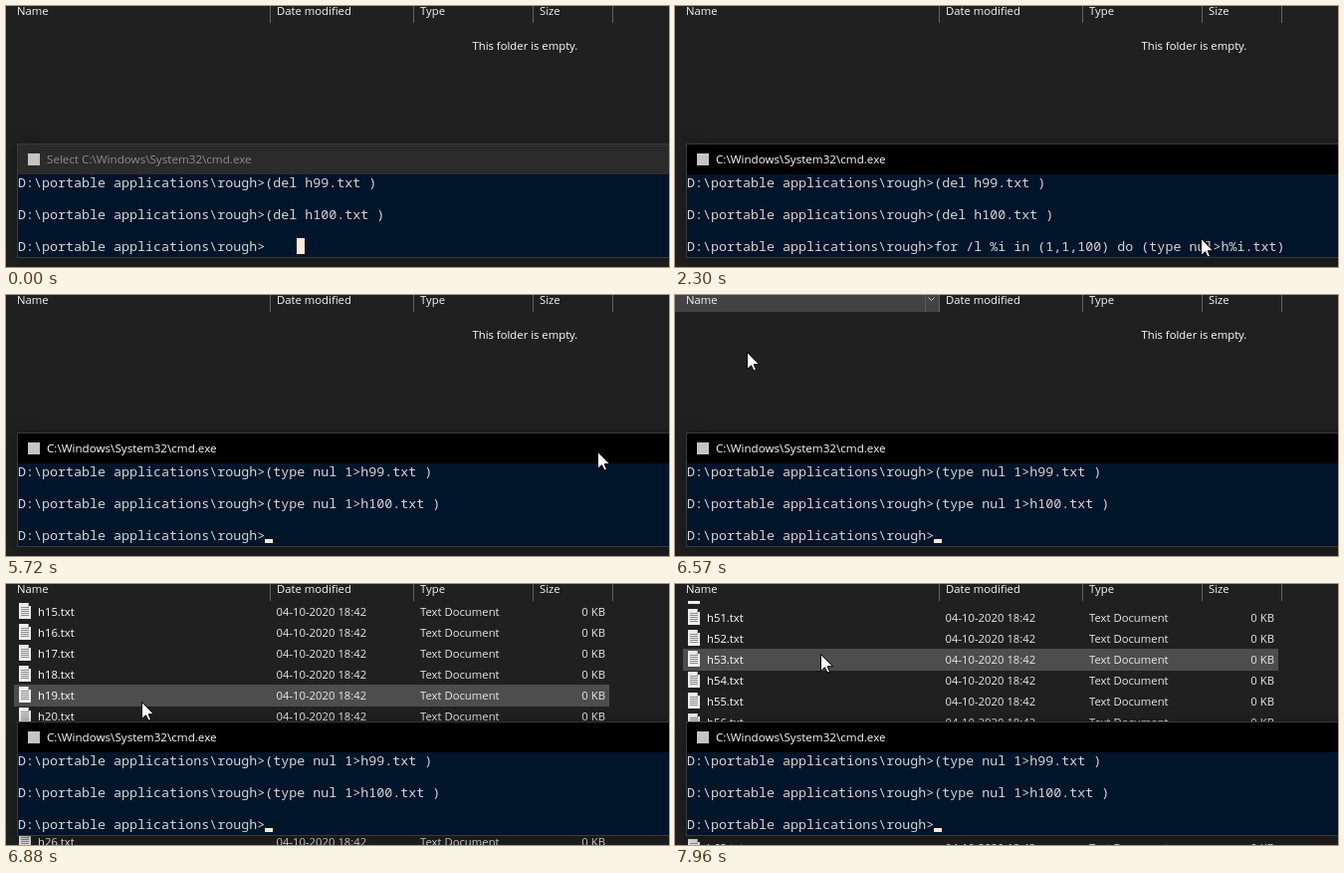
Write an HTML page with a canvas that moves like this. It is 666 px wide and 262 px high and loops after 8 s.

```html
<!DOCTYPE html>
<html lang="en">
<head>
<meta charset="utf-8">
<title>Creating files in a loop</title>
<style>
html, body { margin: 0; width: 100%; height: 100%; overflow: hidden; background: #202020; }
canvas { display: block; }
</style>
</head>
<body>
<canvas id="stage" width="666" height="262"></canvas>
<script>
const ctx = document.getElementById('stage').getContext('2d');
const LOOP = 8000, STEP = 77, BLINK = 543;
const UI = '11.3px "Open Sans", "Noto Sans", sans-serif';
const TITLE = '11.65px "Open Sans", "Noto Sans", sans-serif';
const MONO = '13.35px "Noto Sans Mono", "DejaVu Sans Mono", monospace';

const PROMPT = 'D:\\portable applications\\rough>';
const LOOP_HEAD = 'for /l %i in (1,1,100) do ';
const CELL = 8, LINE = 16, CON_X = 12, CON_Y = 169;
const ROW = 21, FIRST_ROW = 34, HEADER = 17;

// Moments of the story, in ms
const ENTER = 500, CLICK = ENTER + 2 * STEP, CLICK_END = 900, FIRST_BLINK = 1280;
const RECALL = 1510, RECALL_AGAIN = 2130, BLINK_AGAIN = 2300, DRIFT = 3400;
const RUN = 4940, LEAVE = 5720, HOVER = LEAVE + 12 * STEP;
const LISTED = LEAVE + 13 * STEP, WHEEL = LISTED + STEP, WHEEL_2 = 7340, WHEEL_3 = 7880;

const clamp = (v, lo, hi) => Math.min(hi, Math.max(lo, v));
const lerp = (a, b, u) => a + (b - a) * u;

// The screen refreshes in fixed steps while something moves.
const steps = (t, start, count) => clamp(Math.floor((t - start) / STEP) + 1, 0, count);
const progress = (t, start, count) => steps(t, start, count) / count;

const line = (from, to, u) => from.map((v, i) => lerp(v, to[i], u));

function bezier(a, b, c, d, u) {
  const ab = line(a, b, u), bc = line(b, c, u), cd = line(c, d, u);
  return line(line(ab, bc, u), line(bc, cd, u), u);
}

function pointerAt(t) {
  const prompt = [529, 233], titleBar = [621, 164], list = [73, 57], row = [137, 118];
  if (t < DRIFT) return line([500, 265], prompt, progress(t, ENTER, 3));
  if (t < LEAVE) return line(prompt, titleBar, progress(t, DRIFT, 4));
  if (t < HOVER) return bezier(titleBar, [551, 154], [60, -90], list, progress(t, LEAVE, 12));
  if (t < WHEEL_2) return line(list, row, progress(t, HOVER, 4));
  return line(row, [147, 70], progress(t, WHEEL_2, 4));
}

function scrollAt(t) {
  const slow = steps(t, WHEEL_2, 4) + steps(t, WHEEL_3, 2);
  return Math.min(20 * ROW, 150 * steps(t, WHEEL, 5)) + 5 * ROW * slow;
}

function caretOn(t) {
  if (t < RECALL_AGAIN) return t >= FIRST_BLINK && t < FIRST_BLINK + BLINK;
  if (t < RUN) return t < BLINK_AGAIN || Math.floor((t - BLINK_AGAIN) / BLINK) % 2 === 1;
  return t >= LEAVE;
}

function rect(color, x, y, w, h) {
  ctx.fillStyle = color;
  ctx.fillRect(x, y, w, h);
}

function text(str, x, y, color, font = UI, align = 'left') {
  ctx.font = font;
  ctx.textAlign = align;
  ctx.fillStyle = color;
  ctx.fillText(str, x, y);
}

function pageIcon(x, y) {
  rect('#ececec', x, y, 9, 16);
  rect('#ececec', x + 9, y + 3, 3, 13);
  rect('#b4b4b4', x + 9, y, 1, 4);
  for (let i = 0; i < 5; i++) rect('#8c8c8c', x + 2, y + 4 + i * 2, 8, 1);
}

function drawFiles(scroll, mouseY) {
  const hovered = Math.floor((mouseY - FIRST_ROW + 11 + scroll) / ROW) + 1;
  for (let n = 1; n <= 100; n++) {
    const y = FIRST_ROW + (n - 1) * ROW - scroll;
    if (y < 0 || y > 280) continue;
    if (n === hovered) rect('#4d4d4d', 8, y - 11, 598, ROW + 1);
    pageIcon(13, y - 9);
    text(`h${n}.txt`, 32, y + 4, '#fff');
    text('04-10-2020 18:42', 271.5, y + 4, '#e8e8e8');
    text('Text Document', 416, y + 4, '#e8e8e8');
    text('0 KB', 602, y + 4, '#e8e8e8', UI, 'right');
  }
}

function drawHeader(hot) {
  rect('#202020', 0, 0, 666, HEADER);
  if (hot) {
    rect('#434343', 0, 0, 265, HEADER);
    rect('#5a5a5a', 251, 0, 1, HEADER);
    ctx.strokeStyle = '#c8c8c8';
    ctx.lineWidth = 1;
    ctx.stroke(new Path2D('M254.5 2.5l3 3l3 -3'));
  }
  const columns = { 'Name': 11, 'Date modified': 272, 'Type': 416, 'Size': 536 };
  for (const [label, x] of Object.entries(columns)) {
    text(label, x, 9, '#f4f4f4');
    if (x > 11) rect('#636363', x - 7, 0, 1, HEADER);
  }
  rect('#636363', 609, 0, 1, HEADER);
}

function typedCommand(t) {
  if (t < RECALL || t >= RUN) return '';
  return LOOP_HEAD + (t < RECALL_AGAIN ? '(del h%i.txt)' : '(type nul>h%i.txt)');
}

function consoleLines(t) {
  if (t < RUN) return ['(del h99.txt )', '(del h100.txt )', typedCommand(t)];
  const last = 100 * progress(t, RUN, 4);
  return [`(type nul 1>h${last - 1}.txt )`, `(type nul 1>h${last}.txt )`, ''];
}

function drawConsole(t) {
  const active = t >= CLICK, selecting = t < RECALL;
  ctx.save();
  ctx.shadowColor = 'rgba(0,0,0,0.4)';
  ctx.shadowBlur = 14;
  ctx.shadowOffsetY = 3;
  rect('#3a3a3a', 11, 138, 700, 115);
  ctx.restore();
  rect(active ? '#000' : '#2b2b2b', 12, 139, 654, 30);
  rect('#00152a', 12, CON_Y, 654, 83);
  rect('#c4c4c4', 22, 148, 12, 12);
  text((selecting ? 'Select ' : '') + 'C:\\Windows\\System32\\cmd.exe',
    41, 158, active ? '#fff' : '#8c8c8c', TITLE);

  consoleLines(t).forEach((command, i) =>
    text(PROMPT + command, CON_X, CON_Y + i * 2 * LINE + 13, '#d4d4d4', MONO));

  const base = CON_Y + 4 * LINE;
  if (selecting) rect('#ffead5', active ? 524 : 292, base, CELL, LINE);
  if (caretOn(t)) {
    const column = PROMPT.length + typedCommand(t).length;
    rect('#ffead5', CON_X + column * CELL, base + 12, CELL, 4);
  }
}

const ARROW = new Path2D('M0 0V17L4 13.2L6.6 18.6L9 17.6L6.7 12.2H12Z');

function drawPointer([x, y], clicked) {
  ctx.save();
  ctx.translate(Math.round(x), Math.round(y));
  if (clicked) {
    ctx.fillStyle = 'rgba(255,255,0,0.47)';
    ctx.beginPath();
    ctx.arc(0, 0, 12, 0, Math.PI * 2);
    ctx.fill();
  }
  ctx.translate(-0.5, 0.5);
  ctx.fillStyle = '#fff';
  ctx.fill(ARROW);
  ctx.strokeStyle = '#000';
  ctx.lineWidth = 1;
  ctx.stroke(ARROW);
  ctx.restore();
}

function draw(t) {
  const pointer = pointerAt(t);
  rect('#202020', 0, 0, 666, 262);
  if (t >= LISTED) drawFiles(scrollAt(t), pointer[1]);
  else text('This folder is empty.', 468.5, 44, '#fff');
  drawHeader(t >= HOVER - 4 * STEP && t < HOVER);
  drawConsole(t);
  if (t >= ENTER) drawPointer(pointer, t >= CLICK && t < CLICK_END);
}

function frame() {
  draw(performance.now() % LOOP);
  requestAnimationFrame(frame);
}
frame();
</script>
</body>
</html>
```
